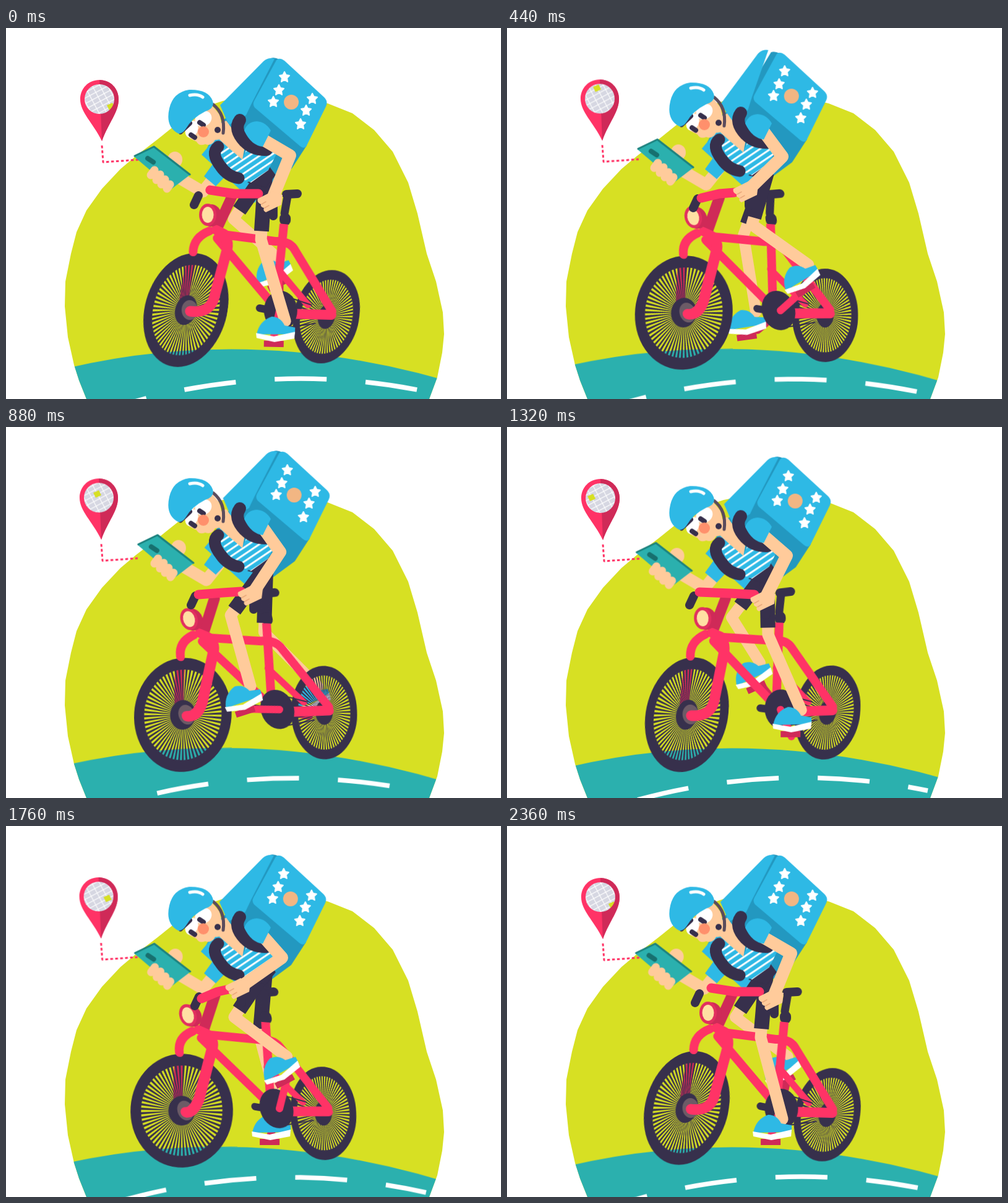
An HTML page without scripts that plays this animation: 800x600 px, repeating every 2400 ms.

```html
<!DOCTYPE html>
<html lang="en">
<head>
<meta charset="utf-8">
<title>Delivery rider</title>
<style>
html, body { margin: 0; width: 100%; height: 100%; overflow: hidden; background: #fff; }
svg { display: block; width: 100vw; height: 100vh; }
:root {
  --sine: cubic-bezier(.37, 0, .63, 1);
  --blue: #2eb9e5; --deep: #2398c0; --pink: #ff3366; --wine: #cf2a58;
  --navy: #37304c; --skin: #ffcb9b; --teal: #2bb0ae;
}
.blue { fill: var(--blue); } .deep { fill: var(--deep); } .pink { fill: var(--pink); }
.wine { fill: var(--wine); } .navy { fill: var(--navy); } .skin { fill: var(--skin); }
.white { fill: #fff; } .teal { fill: var(--teal); }
.line { fill: none; stroke-linecap: round; stroke-linejoin: round; }
.line.pink { stroke: var(--pink); } .line.wine { stroke: var(--wine); }
.line.navy { stroke: var(--navy); } .line.skin { stroke: var(--skin); } .line.white { stroke: #fff; }
.line.pink, .line.wine, .line.navy, .line.skin, .line.white { fill: none; }

/* Body bounces twice per pedal turn; the box follows a little later. */
.bob { animation: bob .6s var(--sine) -.58s infinite; }
.reach { animation: reach .6s var(--sine) -.58s infinite; }
.box { animation: boxY .6s var(--sine) -.54s infinite; }
.sway { animation: boxX .6s var(--sine) -.4s infinite; }
.lid { transform-origin: 397px 123px; animation: lid .6s ease-in-out infinite; }
@keyframes bob { 50% { transform: translateY(-18px); } }
@keyframes reach { 50% { transform: translateX(6px); } }
@keyframes boxY { 50% { transform: translateY(-13px); } }
@keyframes boxX { 0%, 100% { transform: translateX(6px); } 50% { transform: translateX(-2px); } }
@keyframes lid { 0%, 49%, 92%, 100% { transform: none; } 68% { transform: rotate(-9deg); } }

/* Bike leans with each pedal turn and pitches once per loop. */
.pitch { transform-origin: 435px 462px; animation: pitch 2.4s var(--sine) -.1s infinite; }
.lean, .steer, .tilt, .drift, .fork, .stem { animation: 1.2s var(--sine) -1.14s infinite; }
.lean { transform-origin: 0 505px; animation-name: lean; }
.steer { animation-name: steer; }
.tilt { transform-origin: 403px 520px; animation-name: tilt; }
.drift { animation-name: drift; }
.fork { animation-name: fork; }
.stem { animation-name: stem; }
.spin { animation: spin 1.2s linear infinite; }
@keyframes pitch { 50% { transform: rotate(-4deg); } }
@keyframes lean { 50% { transform: skewX(8.5deg); } }
@keyframes steer { 50% { transform: scaleX(1.25); } }
@keyframes tilt { 50% { transform: rotate(1.05deg); } }
@keyframes drift { 50% { transform: translate(-1.5px, -1px); } }
@keyframes spin { to { transform: rotate(-360deg); } }
@keyframes fork {
  0%, 100% { d: path("M346 334Q362 337 358 358L337 436Q330 462 298 458"); }
  50% { d: path("M348 334Q364 338 358 354L321 438Q308 460 297 459"); }
}
@keyframes stem {
  0%, 100% { d: path("M366 272L341 326"); }
  50% { d: path("M377 270L349 326"); }
}

.leg, .foot, .crank, .arm, .hand, .bar, .grip { animation: 1.2s linear infinite; }
.leg { animation-name: leg; } .foot { animation-name: foot; } .crank { animation-name: crank; }
.arm { animation-name: arm; } .hand { animation-name: hand; }
.bar { animation-name: bar; } .grip { animation-name: grip; }
.far { animation-delay: -.6s; }
.shorts { stroke-dasharray: 38 100; stroke-linecap: butt; }
@keyframes leg {
  0%, 100% { d: path("M419 236L412 342L451 474"); }
  10% { d: path("M420 236L422 336L475 458"); }
  23.3% { d: path("M420 232L417 332L504 420"); }
  36.7% { d: path("M420 234L396 318L487 383"); }
  46.7% { d: path("M418 236L369 309L454 373"); }
  60% { d: path("M418 236L363 308L409 381"); }
  73.3% { d: path("M416 232L363 304L395 419"); }
  86.7% { d: path("M418 234L382 335L402 459"); }
  96.7% { d: path("M419 236L410 342L445 474"); }
}
@keyframes foot {
  0%, 100% { transform: translate(437px, 487px) rotate(1deg); }
  10% { transform: translate(462px, 473px) rotate(0deg); }
  23.3% { transform: translate(493px, 437px) rotate(-20deg); }
  36.7% { transform: translate(474px, 401px) rotate(-30deg); }
  46.7% { transform: translate(443px, 390px) rotate(-28deg); }
  60% { transform: translate(397px, 397px) rotate(-24deg); }
  73.3% { transform: translate(383px, 436px) rotate(-18deg); }
  86.7% { transform: translate(388px, 475px) rotate(-8deg); }
  96.7% { transform: translate(430px, 487px) rotate(0deg); }
}
@keyframes crank {
  10% { transform: rotate(-34deg); }
  36.7% { transform: rotate(-144deg); }
  46.7% { transform: rotate(-178deg); }
  73.3% { transform: rotate(-281deg); }
  96.7% { transform: rotate(-353deg); }
  100% { transform: rotate(-360deg); }
}
@keyframes arm {
  0%, 96.7%, 100% { d: path("M416 181L459 206L433 270"); }
  10% { d: path("M416 177L452 208L420 272"); }
  23.3% { d: path("M416 164L447 200L402 268"); }
  36.7% { d: path("M416 169L445 208L392 260"); }
  46.7% { d: path("M416 179L446 213L382 258"); }
  60% { d: path("M416 176L446 208L384 260"); }
  73.3% { d: path("M416 164L443 202L402 264"); }
  86.7% { d: path("M416 170L450 202L420 267"); }
}
@keyframes hand {
  0%, 96.7%, 100% { transform: translate(427px, 280px); }
  10% { transform: translate(414px, 280px); }
  23.3% { transform: translate(400px, 274px); }
  36.7% { transform: translate(386px, 264px); }
  46.7% { transform: translate(375px, 262px); }
  60% { transform: translate(378px, 266px); }
  73.3% { transform: translate(395px, 271px); }
  86.7% { transform: translate(414px, 275px); }
}
@keyframes bar {
  0%, 96.7%, 100% { d: path("M330 262L369 268L408 268"); }
  10% { d: path("M311 267L360 269L400 271"); }
  36.7% { d: path("M314 275L343 268L368 266"); }
  46.7% { d: path("M316 279L342 268L360 264"); }
  73.3% { d: path("M311 271L350 268L380 266"); }
}
@keyframes grip {
  0%, 96.7%, 100% { transform: translate(308px, 279px); }
  10% { transform: translate(299px, 281px); }
  36.7% { transform: translate(305px, 284px); }
  46.7% { transform: translate(309px, 284px); }
  73.3% { transform: translate(303px, 281px); }
}

.dashes { stroke-dasharray: 84 63; animation: dashes 2.4s linear infinite; }
@keyframes dashes {
  0% { stroke-dashoffset: 4px; }
  18.33% { stroke-dashoffset: -142px; }
  36.67% { stroke-dashoffset: -246px; }
  55% { stroke-dashoffset: -358px; }
  73.33% { stroke-dashoffset: -471px; }
  86.67% { stroke-dashoffset: -588px; }
  98.33%, 100% { stroke-dashoffset: -731px; }
}
.map { animation: map 2.4s linear infinite; }
@keyframes map {
  0%, 100% { transform: translate(169px, 127px); }
  18.33% { transform: translate(146px, 98px); }
  36.67% { transform: translate(148px, 109px); }
  55% { transform: translate(136px, 114px); }
  73.33% { transform: translate(165px, 118px); }
  86.67% { transform: translate(169px, 110px); }
  98.33% { transform: translate(170px, 128px); }
}
.lids { opacity: 0; animation: blink 2.4s step-end infinite; }
@keyframes blink { 0% { opacity: 0; } 85% { opacity: 1; } 90% { opacity: 0; } }
</style>
</head>
<body>
<svg viewBox="0 0 800 600">
  <defs>
    <path id="hill" d="M130 600L118 570L110 545L100 500L95 450L96 410L105 365L114 330L130 295L155 260L185 228L210 207L245 180L280 152L320 128L350 118L400 108L460 108L520 122L560 138L595 165L625 200L650 250L665 300L680 365L695 410L706 460L708 495L705 525L697 565L684 600Z"/>
    <clipPath id="hillClip"><use href="#hill"/></clipPath>
    <clipPath id="mapClip"><circle cx="151" cy="115" r="24"/></clipPath>
    <pattern id="streets" width="11" height="8" patternUnits="userSpaceOnUse" patternTransform="rotate(-28)">
      <path fill="#d6d7e2" d="M0 0H11V8H0Z"/><path d="M0 0H11M0 0V8" stroke="#fff" stroke-width="2.4"/>
    </pattern>
    <pattern id="stripes" width="9.5" height="9.5" patternUnits="userSpaceOnUse" patternTransform="rotate(-34)">
      <path class="blue" d="M0 0H10V10H0Z"/><path class="white" d="M0 0H10V3H0Z"/>
    </pattern>
    <path id="star" class="white" stroke="#fff" stroke-width="2" stroke-linejoin="round" d="M0 -8L2.5 -3L8 -2L4 2L5 8L0 5L-5 8L-4 2L-8 -2L-2.5 -3Z"/>
    <g id="wheel">
      <g class="spin">
        <circle class="line navy" style="stroke-linecap:butt" r="37" stroke-width="74" pathLength="128" stroke-dasharray="1 1"/>
      </g>
      <circle class="line navy" r="82.5" stroke-width="19"/>
      <circle class="navy" r="24"/>
    </g>
    <g id="shoe">
      <path class="wine" d="M-20 19H12V29H-20Z"/>
      <path class="blue" d="M-32 9Q-28 -13 -8 -20Q6 -20 13 -6L30 -3V8Z"/>
      <path class="white" d="M-33 7L-4 12L30 4L29 15L-3 21L-32 15Z"/>
    </g>
  </defs>

  <use href="#hill" fill="#d7e023"/>
  <g clip-path="url(#hillClip)">
    <g class="tilt">
      <path class="teal" d="M60 560Q400 468 760 585V650H60Z"/>
      <path class="line white dashes" style="stroke-linecap:butt" stroke-width="7.5" d="M150 622A1000 1000 0 0 1 680 588"/>
    </g>
  </g>

  <g class="drift">
    <path class="pink" d="M151 84C133 84 120 98 120 115C120 137 140 152 155 183C166 152 182 137 182 115C182 98 169 84 151 84Z"/>
    <path class="wine" d="M151 84C169 84 182 98 182 115C182 137 166 152 155 183Z"/>
    <g clip-path="url(#mapClip)">
      <g class="map">
        <path fill="url(#streets)" d="M-80 -80H80V80H-80Z"/>
        <path fill="#d7e023" d="M-6 -2L3 -6L7 2L-2 6Z"/>
      </g>
    </g>
    <path class="line" stroke="var(--pink)" style="stroke-linecap:butt" stroke-width="3" stroke-dasharray="4.5 3.5" d="M155 190L157 217L214 213"/>
  </g>

  <g class="box"><g class="sway">
    <path class="deep" d="M398 122L486 191L462 228L405 270L325 195L350 150Z"/>
    <path class="blue" d="M350 165L316 206L402 284L414 262Z"/>
    <path class="deep" d="M428 50Q434 48 442 52L402 126L388 144L376 136Z"/>
    <path class="blue lid" d="M346 126L416 55Q424 48 434 51L397 123L388 142L360 158Z"/>
    <path class="blue" d="M437 53Q442 48 450 54L514 113Q521 120 517 128L486 191Q482 198 475 192L402 130Q398 125 401 119Z"/>
    <use href="#star" x="450" y="80"/><use href="#star" x="441" y="101"/><use href="#star" x="432" y="120"/>
    <use href="#star" x="495" y="115"/><use href="#star" x="485" y="134"/><use href="#star" x="476" y="156"/>
    <circle cx="461" cy="121" r="12" fill="#f2b683"/>
  </g></g>

  <!-- far leg -->
  <g transform="translate(442 457)"><path class="line wine crank far" stroke-width="12" d="M0 0L-10 48"/></g>
  <path class="line skin leg far" stroke-width="18"/>
  <path class="line navy leg far shorts" pathLength="100" stroke-width="24"/>
  <g class="foot far"><use href="#shoe"/></g>

  <g class="pitch"><g class="lean">
    <g transform="translate(518 467) skewX(-7) scale(.58 .82)"><use href="#wheel"/></g>
    <path class="line wine" stroke-width="15" d="M302 370Q292 408 288 440"/>
    <g transform="translate(291 456) skewX(-8.5) scale(.73 1)"><g class="steer"><use href="#wheel"/></g></g>
    <ellipse cx="297" cy="456" rx="13" ry="16" fill="#6c5b66"/>
    <path class="line pink" stroke-width="14" d="M303 362Q304 338 330 328"/>
    <path class="line navy" stroke-width="14" d="M454 269L472 268"/>
    <path class="line navy" stroke-width="13" d="M456 272L451 300"/>
    <path class="line navy" stroke-width="18" d="M452 308V311"/>
    <g class="line pink">
      <path stroke-width="14" style="stroke-linecap:butt" d="M450 317L437 440"/>
      <path stroke-width="11" d="M440 390L488 448"/>
      <path stroke-width="14" d="M342 340L432 448"/>
      <path stroke-width="14" d="M352 334L436 345Q460 344 468 360L527 458"/>
      <path stroke-width="16" d="M456 462L526 464"/>
    </g>
    <path class="line navy" stroke-width="2" d="M440 430L494 448M440 486L500 478"/>
    <path class="line wine stem" stroke-width="17"/>
    <path class="line pink" stroke-width="15" d="M340 326L354 333"/>
    <path class="line pink fork" stroke-width="17"/>
    <ellipse class="wine" cx="332" cy="303" rx="17" ry="18"/>
    <ellipse cx="327" cy="302" rx="14" ry="18" fill="#e22f5f"/>
    <ellipse cx="327" cy="302" rx="9.5" ry="13" fill="#ffe0a3"/>
    <path class="line navy" stroke-width="12" d="M410 453L420 455"/>
    <ellipse class="navy" cx="444" cy="457" rx="27" ry="32"/>
  </g></g>
  <g transform="translate(442 457)"><path class="line pink crank" stroke-width="12" d="M0 0L-10 46"/></g>

  <!-- near leg -->
  <path class="line skin leg" stroke-width="19"/>
  <path class="line navy leg shorts" pathLength="100" stroke-width="24"/>
  <g class="foot"><use href="#shoe"/></g>

  <g class="bob">
    <g class="reach">
      <ellipse class="skin" cx="273" cy="213" rx="12" ry="13"/>
      <path class="line skin" stroke-width="19" d="M272 238L318 265L338 240"/>
      <path class="teal" d="M207 208L240 191L298 237L268 260Z"/>
      <path class="line" stroke="#1c817e" stroke-width="3" d="M208 207L239 192L297 237"/>
      <path class="line" stroke="#17706f" stroke-width="8" d="M229 211L238 217"/>
      <g class="line skin" stroke-width="13">
        <path d="M240 230L234 238M249 237L243 246M257 245L251 253M265 253L260 260"/>
      </g>
    </g>
    <path class="blue" d="M320 240L340 212L362 232L339 256Z"/>
    <path class="navy" d="M390 250L424 222L436 238L420 258Z"/>
    <path fill="url(#stripes)" d="M346 200L366 182L382 210L396 182L437 204L424 230L396 250L366 238Z"/>
    <path class="skin" d="M344 155L356 150L386 192L382 213L362 196L340 176Z"/>
    <path class="line navy" stroke-width="19" d="M343 192Q330 202 347 224Q358 240 376 243"/>
    <path class="line navy" stroke-width="20" d="M378 149Q367 164 386 184Q400 198 421 197"/>
    <!-- head -->
    <path class="skin" d="M292 160L330 122L345 140L352 172Q348 182 338 181Q332 192 322 188Q312 192 308 184L296 178Z"/>
    <ellipse class="white" cx="319" cy="147" rx="14" ry="12" transform="rotate(-35 319 147)"/>
    <ellipse class="white" cx="300" cy="164" rx="10" ry="14" transform="rotate(20 300 164)"/>
    <path class="line navy" stroke-width="8" d="M313 153L319 157M299 173L305 177"/>
    <g class="lids" fill="#f2667c">
      <ellipse cx="318" cy="148" rx="15" ry="11" transform="rotate(-35 318 148)"/>
      <ellipse cx="300" cy="166" rx="9" ry="12"/>
      <path class="line white" stroke-width="6" d="M312 153L326 142M300 170L306 162"/>
      <path class="line navy" stroke-width="6" d="M299 174L302 176M312 149L315 153"/>
    </g>
    <circle cx="319" cy="168" r="9" fill="#ff906c"/>
    <path class="line" stroke="#5b4c5c" stroke-width="5" d="M335 124Q355 140 351 170"/>
    <circle class="navy" cx="342" cy="165" r="5"/>
    <path class="line navy" stroke-width="8" d="M282 168L297 154"/>
    <path class="blue" d="M279 171Q257 160 264 130Q270 104 296 100Q327 99 334 118Q338 130 322 135Q300 146 290 164Q285 171 279 171Z"/>
    <path class="line white" stroke-width="5" d="M297 109Q310 106 318 112"/>
  </g>

  <g class="grip"><path class="line navy" stroke-width="14" d="M3 -8L-4 7"/></g>
  <path class="line pink bar" stroke-width="15"/>
  <path class="line skin arm" stroke-width="20"/>
  <g class="hand">
    <path class="line navy" stroke-width="14" d="M5 8V24"/>
    <path class="skin" d="M-20 -4L4 -16L20 -10L18 6L-7 18Q-12 16 -10 11Q-16 10 -15 5Q-22 2 -20 -4Z"/>
    <path class="line" stroke="#eaa97c" stroke-width="1.5" d="M-14 5L-7 1M-9 11L-2 7"/>
  </g>
  <path class="blue bob" d="M385 166Q390 152 405 151Q420 152 428 166L415 192Q396 190 385 166Z"/>
</svg>
</body>
</html>
```
